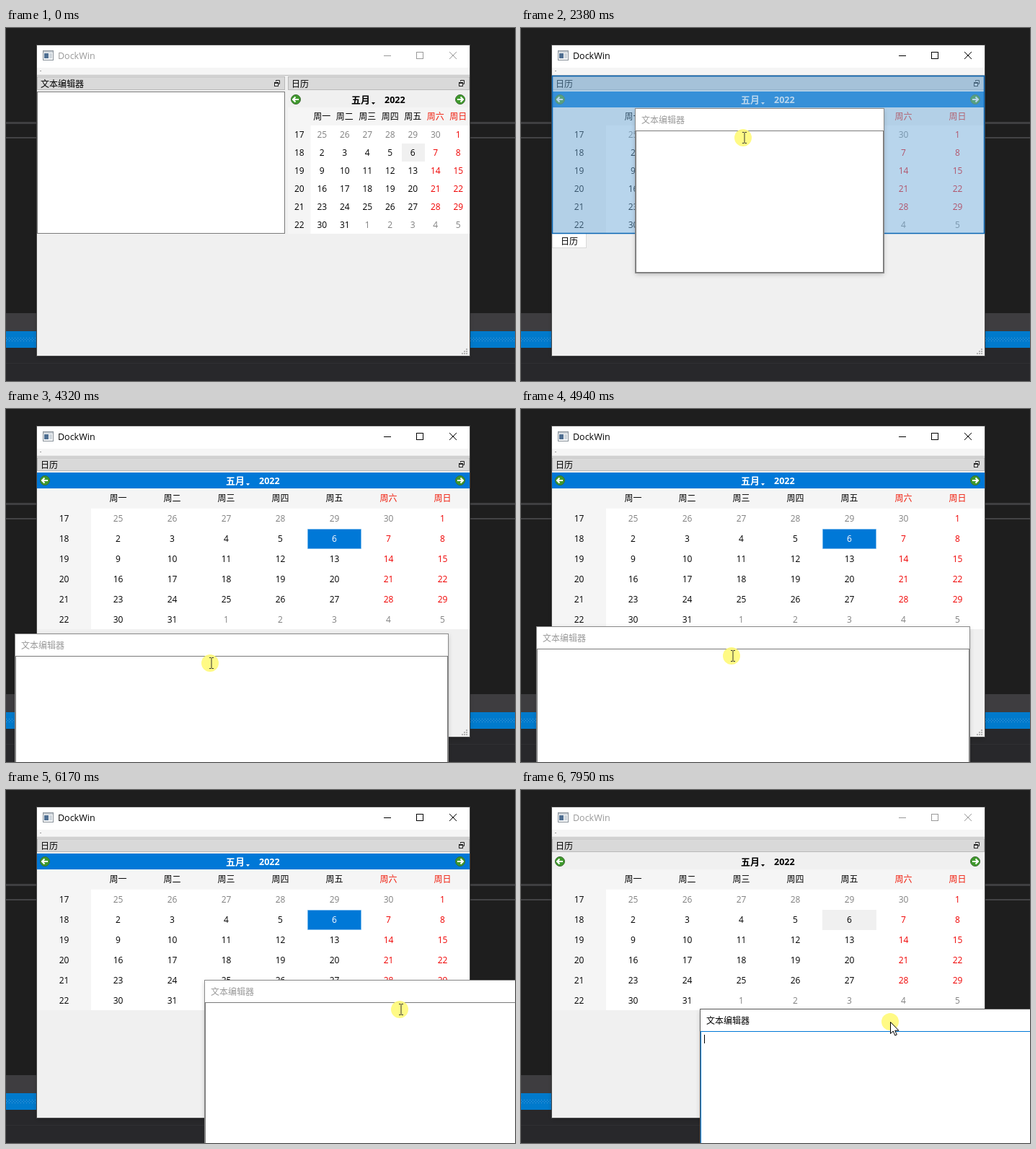
Animation, 706 px wide and 489 px high, one loop 8 s. Source, as an HTML page:

```html
<!DOCTYPE html>
<html lang="zh-CN">
<head>
<meta charset="utf-8">
<title>Dock windows</title>
<style>
html, body { margin: 0; width: 100%; height: 100%; overflow: hidden; background: #1e1e1e; }
svg { display: block; width: 100vw; height: 100vh; }
text { font-family: "Open Sans", "Noto Sans CJK SC", "Noto Sans CJK", sans-serif; font-size: 12px; white-space: pre; }
</style>
</head>
<body>
<svg viewBox="0 0 706 489" xmlns="http://www.w3.org/2000/svg">
  <defs>
    <pattern id="dots" width="4" height="4" patternUnits="userSpaceOnUse">
      <path d="M0 1h1v1h-1zM2 3h1v1h-1z" fill="#429dda"/>
    </pattern>
    <filter id="shadow" x="-10%" y="-10%" width="120%" height="120%">
      <feDropShadow dx="0" dy="2" stdDeviation="3" flood-opacity=".25"/>
    </filter>
  </defs>
  <g id="scene"></g>
</svg>
<script>
const LOOP = 8000, STEP = 77.1, LEAD = 8;
const BLUE = '#0078d7', FACE = '#f0f0f0', PALE = '#f5f5f5', GREY = '#999';
const EDITOR = '文本编辑器', CALENDAR = '日历';
const LEFT = 43, RIGHT = 643;
const scene = document.getElementById('scene');

// Paths are lists of [step, x, y].
const pointerIn = [[1, 574, 449], [4, 470, 330], [8, 240, 130], [11, 156, 74], [12, 182, 76], [13, 192, 77]];
const pointerTab = [[33, 320, 107], [34, 319, 104], [39, 314, 78], [41, 314, 78], [42, 314, 77]];
const pointerFloat = [[85, 551, 316], [86, 551, 316], [90, 549, 301], [93, 544, 293]];
const dragNarrow = [[14, 48, 62], [16, 70, 130], [18, 100, 208], [21, 118, 243], [23, 122, 246], [27, 140, 180], [32, 171, 67]];
const dragWide = [[44, 46, 66], [46, 62, 170], [49, 63, 291], [52, 40, 316], [55, 14, 314], [60, 11, 306],
  [64, 22, 302], [66, 44, 290], [69, 190, 205], [70, 228, 184], [74, 228, 184], [75, 232, 181],
  [77, 246, 205], [79, 270, 252], [81, 281, 276]];
const dragTitle = [[93, 281, 276], [97, 264, 288], [100, 254, 299], [103, 249, 304]];

function along(path, k) {
  let i = 0;
  while (i < path.length - 2 && k > path[i + 1][0]) i++;
  const [a, x, y] = path[i], [b, u, v] = path[i + 1];
  const p = ramp(k, a, b);
  return [Math.round(x + (u - x) * p), Math.round(y + (v - y) * p)];
}
const ramp = (k, a, b) => Math.min(1, Math.max(0, (k - a) / (b - a)));

const rect = (x, y, w, h, fill, more = '') => `<rect x="${x}" y="${y}" width="${w}" height="${h}" fill="${fill}" ${more}/>`;
const frame = (x, y, w, h, fill, stroke, more = '') => rect(x + .5, y + .5, w - 1, h - 1, fill, `stroke="${stroke}" ${more}`);
const line = (d, stroke, width = 1) => `<path d="${d}" fill="none" stroke="${stroke}" stroke-width="${width}"/>`;
const text = (s, x, y, fill = '#000', more = '') => `<text x="${x}" y="${y}" fill="${fill}" ${more}>${s}</text>`;
const middle = (s, x, y, fill) => text(s, x, y + 4.5, fill, 'text-anchor="middle"');

function backdrop() {
  return rect(0, 0, 706, 489, '#1e1e1e') +
    rect(0, 130, 706, 3, '#3f3f41') + rect(0, 151, 706, 2, '#434345') +
    rect(0, 395, 706, 25, '#3e3d40') + rect(0, 420, 706, 23, '#007acc') +
    rect(0, 428, 706, 7, 'url(#dots)') +
    rect(0, 443, 706, 46, '#28282b') + rect(0, 464, 706, 1, '#303033');
}

function mainWindow(active) {
  const ink = active ? '#000' : GREY;
  let s = rect(LEFT, 24, 600, 430, FACE, 'filter="url(#shadow)"') +
    frame(LEFT - 1, 23, 602, 432, FACE, '#484848') +
    rect(LEFT, 24, 600, 31, '#fff') + rect(LEFT, 55, 600, 10, PALE) +
    rect(LEFT, 65, 600, 1, '#b8b8b8') + rect(47, 59, 2, 1, '#999') +
    frame(51, 31, 15, 14, '#f4f6f8', '#8c949c') + rect(52, 32, 13, 2, '#c3cad1') +
    rect(53, 35, 6, 7, '#4f6f92') + rect(60, 35, 4, 7, '#cfd6dc') +
    text('DockWin', 72, 43, ink, 'style="font-size:12.5px"') +
    line('M524 38.5h10', ink) + frame(569, 33, 10, 10, 'none', ink) +
    line('M615 33l10 10M625 33l-10 10', ink);
  for (let i = 0; i < 3; i++)
    for (let j = 0; j <= i; j++) s += rect(638 - j * 3, 444 + i * 3, 2, 2, '#b4b4b4');
  return s;
}

function dockTitle(name, x, right) {
  const b = right - 15;
  return frame(x, 67, right - x, 19, '#d9d9d9', '#b9b9b9') + text(name, x + 5, 81.5) +
    line(`M${b + 2.5} 74v-1.5h5v5h-2`, '#222') + frame(b, 75, 6, 6, '#e8e8e8', '#222') +
    rect(b, 75, 6, 2, '#222');
}

function navArrow(x, dir) {
  return `<g transform="translate(${x} 99) scale(${dir} 1)"><circle r="6.5" fill="#3f9a2c" stroke="#3d6b34"/>` +
    line('M-4 0H4M.5-3.5L4 0L.5 3.5', '#fff', 2) + '</g>';
}

function calendar(x, active, bottom) {
  const w = RIGHT - x, cw = w / 8, rh = (bottom - 110) / 7, mid = x + w / 2;
  const ink = active ? '#fff' : '#000', bold = 'font-weight="700" style="font-size:';
  const cx = c => x + cw * (c + .5), cy = r => 110 + rh * (r + .5);
  let s = dockTitle(CALENDAR, x, RIGHT) +
    rect(x, 88, w, 22, active ? BLUE : FACE) + navArrow(x + 11, -1) + navArrow(RIGHT - 13, 1) +
    text('五月', mid - 38, 104, ink, bold + '13px"') + text('2022', mid + 8, 103.5, ink, bold + '12.5px"') +
    `<path d="M${mid - 10} 103h5l-2.5 3z" fill="${ink}"/>` +
    rect(x, 110, w, bottom - 110, PALE) + rect(x + cw, 110 + rh, w - cw, bottom - 110 - rh, '#fff');
  [...'一二三四五六日'].forEach((d, c) => s += middle('周' + d, cx(c + 1), cy(0), c > 4 ? '#f02010' : '#000'));
  for (let r = 0; r < 6; r++) s += middle(17 + r, cx(0), cy(r + 1), '#000');
  for (let i = 0; i < 42; i++) {
    const c = i % 7, r = (i - c) / 7 + 1;
    const other = i < 6 || i > 36;
    const day = i < 6 ? 25 + i : i < 37 ? i - 5 : i - 36;
    let fill = other ? '#808080' : c > 4 ? '#f00000' : '#000';
    if (day === 6 && !other) {
      const bx = Math.round(x + cw * (c + 1)), by = Math.round(110 + rh * r);
      const bw = Math.round(cw), bh = Math.round(rh);
      s += active ? frame(bx, by, bw, bh, BLUE, '#6fb4ee', 'stroke-dasharray="1 1"') : rect(bx, by, bw, bh, FACE);
      fill = ink;
    }
    s += middle(day, cx(c + 1), cy(r), fill);
  }
  return s;
}

const editorDock = right => dockTitle(EDITOR, LEFT, right) + frame(LEFT, 88, right - LEFT, 197, '#fff', '#7a7a7a');

function tab(name, x, w, on) {
  return frame(x, on ? 284 : 285, w, on ? 21 : 18, on ? '#fff' : FACE, '#d9d9d9') +
    text(name, x + 12, 299.5);
}

function floating(x, y, w, active, caret) {
  return rect(x, y, w, 227, '#fff', 'filter="url(#shadow)"') +
    frame(x - 1, y - 1, w + 2, 229, '#fff', active ? '#5c5c5c' : '#8a8a8a') +
    text(EDITOR, x + 8, y + 19.5, active ? '#000' : GREY) +
    frame(x, y + 30, w, 197, '#fff', active ? BLUE : '#7a7a7a') +
    (caret ? rect(x + 5, y + 35, 1, 12, '#000') : '');
}

const halo = (x, y) => `<circle cx="${x}" cy="${y}" r="12" fill="#fffa78" opacity=".9"/>`;
const beam = (x, y) => line(`M${x - 1} ${y - 7.5}h2.5M${x + 2.5} ${y - 7.5}h2.5M${x - 1} ${y + 7.5}h2.5M${x + 2.5} ${y + 7.5}h2.5M${x + 2} ${y - 7}v14`, '#333');
const arrow = (x, y) => `<path transform="translate(${x + .5} ${y + .5})" d="M0 0v16l3.7-3.5 2.6 6 2.5-1-2.6-5.8h5.2z" fill="#fff" stroke="#000"/>`;

function draw(k) {
  const active = k >= 12 && k < 85, floatActive = k >= 85;
  const tabbed = k >= 33 && k < 44;
  let pos = null, width = 600, tip = null, pressed = false;

  if (k >= 14 && k < 33) {
    pos = along(dragNarrow, k);
    width = 344;
    tip = [pos[0] + 149, pos[1] + 40];
    pressed = true;
  } else if (k >= 44 && k < 85) {
    pos = along(dragWide, k);
    tip = [pos[0] + 270, pos[1] + 40];
    pressed = true;
  } else if (k >= 85) {
    pos = along(dragTitle, Math.max(k, 93));
    pressed = k > 93;
    tip = pressed ? [pos[0] + 263, pos[1] + 17] : along(pointerFloat, k);
  } else if (k >= 1) {
    tip = along(tabbed ? pointerTab : pointerIn, k);
  }

  const hover = pressed && k < 85 && tip[1] <= 286;
  const left = k < 14 ? 391 : Math.round(391 - 348 * ramp(k, 13, 17));
  const bottom = hover || k < 53 ? 285 : 285 + 20 * ramp(k, 52, 55);

  let s = backdrop() + mainWindow(active);
  if (tabbed) {
    s += editorDock(RIGHT) + tab(CALENDAR, LEFT, 48, false) + tab(EDITOR, 91, 84, true);
  } else {
    if (k < 14) s += editorDock(387);
    s += calendar(left, active, bottom);
  }
  if (hover) {
    s += tab(CALENDAR, LEFT, 48, true) +
      rect(LEFT, 66, 600, 219, 'rgba(110,169,217,.49)') + frame(LEFT, 66, 600, 219, 'none', '#0a66b4', 'stroke-width="1.5"');
  }
  const sinceFocus = (k - 85) * STEP;
  if (pos) s += floating(...pos, width, floatActive, floatActive && sinceFocus % 1060 < 530);
  if (tip) {
    const [x, y] = tip;
    const inDock = (tabbed || (k < 14 && x < 387)) && x > LEFT && y > 88 && y < 285;
    const inFloat = pos && y > pos[1] + 30;
    s += (pressed ? halo(x, y) : '') + (inDock || inFloat ? beam(x, y) : arrow(x, y));
  }
  scene.innerHTML = s;
}

let shown = -1;
const start = performance.now();
function tick() {
  const t = (performance.now() - start) % LOOP;
  const k = Math.min(103, Math.floor((t + LEAD) / STEP));
  if (k !== shown) draw(shown = k);
  requestAnimationFrame(tick);
}
tick();
</script>
</body>
</html>
```
